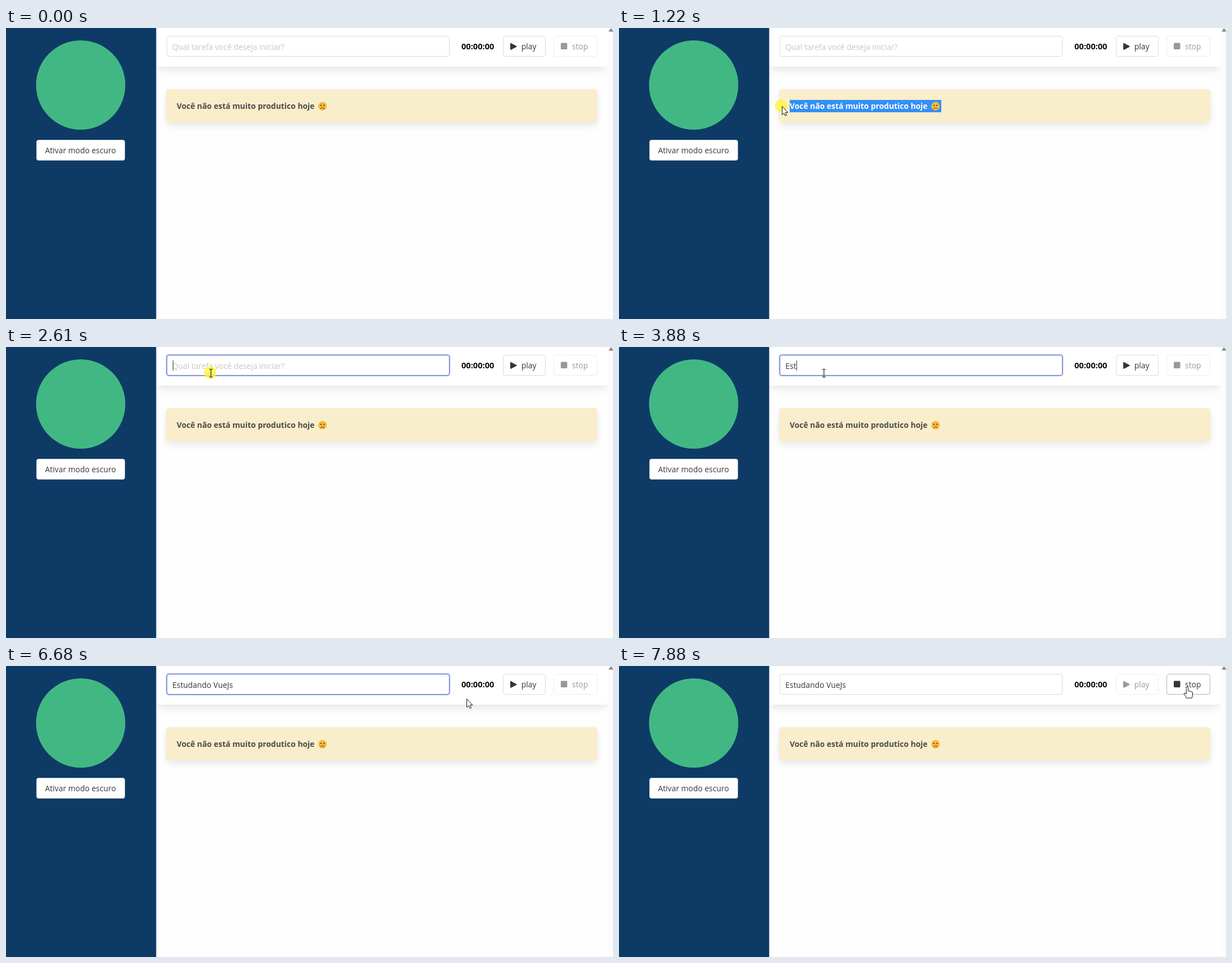
An HTML page that plays this animation: 1081 by 518 pixels, repeating every 8000 ms.

```html
<!DOCTYPE html>
<html lang="pt-BR">
<head>
<meta charset="utf-8">
<title>Tarefas</title>
<style>
html, body { margin: 0; width: 100%; height: 100%; overflow: hidden; background: #fefefe; }
div, svg { position: absolute; box-sizing: border-box; }
svg { left: 0; top: 0; }
text { font: 13.9px "Open Sans", "Noto Sans", sans-serif; fill: #363636; white-space: pre; }
.bold { font-weight: 700; }
.box { box-shadow: 0 7px 15px -2px rgba(10,10,10,.1), 0 0 0 1px rgba(10,10,10,.02); }
.control { background: #fff; border: 1px solid #dbdbdb; border-radius: 4px; top: 13.5px; height: 37px; }
.hover { border-color: #b5b5b5; }
.focus { border-color: #485fc7; box-shadow: 0 0 0 1.8px rgba(72,95,199,.25); }
#sidebar { left: 0; top: 0; width: 268px; height: 518px; background: linear-gradient(90deg, #0d3b66 267px, #fefefe 268px); }
#header { left: 267px; top: 0; width: 804px; height: 69px; background: #fff; border-radius: 0 0 5px 5px; }
#alert { left: 285px; top: 109px; width: 768px; height: 59px; background: #f9eecb; border-radius: 5px; }
#scrollbar { left: 1071px; top: 0; width: 10px; height: 518px; background: #fcfcfc; }
#mode { left: 54px; top: 199px; width: 158px; border-color: #ccd3da; }
#input { left: 286px; width: 504px; }
#play { left: 885px; width: 76px; }
#stop { left: 975px; width: 78px; }
</style>
</head>
<body>
<div id="header" class="box"></div>
<div id="sidebar"></div>
<div id="alert" class="box"></div>
<div id="scrollbar"></div>
<div id="mode" class="control"></div>
<div id="input" class="control"></div>
<div id="play" class="control"></div>
<div id="stop" class="control"></div>
<svg width="1081" height="518">
  <clipPath id="clip"><rect id="clipRect" y="128" width="270" height="22"/></clipPath>
  <circle cx="133" cy="101.5" r="79.5" fill="#41b883"/>
  <path d="M1073 6.5L1077.5 0L1082 6.5Z" fill="#8b8b8b"/>
  <text x="69.5" y="223.4">Ativar modo escuro</text>

  <text id="placeholder" x="296" y="38.5" style="fill:#c6c6c6">Qual tarefa você deseja iniciar?</text>
  <text id="typed" x="296.3" y="38.5"></text>
  <rect id="caret" y="24" width="1" height="18" fill="#363636"/>

  <text class="bold" x="811" y="38" style="font-size:14.6px;fill:#0a0a0a">00:00:00</text>
  <g id="playLabel">
    <path d="M899 27.8V37.8L908.5 32.8Z" fill="#363636" stroke="#363636" stroke-width="2" stroke-linejoin="round"/>
    <text x="917.8" y="38">play</text>
  </g>
  <g id="stopLabel">
    <rect x="988" y="26.5" width="11.5" height="11.5" rx="1.5" fill="#363636"/>
    <text x="1008" y="38">stop</text>
  </g>

  <text class="bold" x="304" y="144" style="fill:#4a4a4a">Você não está muito produtico hoje</text>
  <g id="selection" clip-path="url(#clip)">
    <rect x="304" y="128" width="270" height="22" fill="#3390f5"/>
    <text class="bold" x="304" y="144" style="fill:#fff">Você não está muito produtico hoje</text>
  </g>
  <g transform="translate(563.7 139.2)" fill="#5a4430">
    <circle r="7.6" fill="#fdb93a"/>
    <circle cx="-2.7" cy="-1.5" r="1.2"/>
    <circle cx="2.7" cy="-1.5" r="1.2"/>
    <path d="M-3 4.4Q0 1.2 3 4.4" fill="none" stroke="#5a4430" stroke-width="1.2" stroke-linecap="round"/>
  </g>

  <g id="pointer">
    <circle id="press" cx="-1.3" cy="-.5" r="11" fill="#fff636" opacity=".78"/>
    <path id="arrow" d="M.5 .5V15.6L3.9 12.4L6.2 17.3L8.6 16.2L6.3 11.4H10.8Z" fill="#fff" stroke="#111" stroke-linejoin="round"/>
    <path id="ibeam" d="M-3 -6.5H-1Q0 -6.5 0 -5.5Q0 -6.5 1 -6.5H3M0 -5.5V6.5M-3 7.5H-1Q0 7.5 0 6.5Q0 7.5 1 7.5H3" fill="none" stroke="#222" stroke-width="1.2"/>
    <path id="hand" d="M-1.7 1.6Q-1.7 0 0 0T1.7 1.6V7.5Q3 6.6 4.6 8Q6 7.4 7.2 8.8Q9.5 8.4 9.5 11V14Q9.5 17 8 20H-1.5Q-2.5 17.5 -5 14Q-6.5 11.8 -5.2 11Q-4 10.5 -1.7 13Z" fill="#fff" stroke="#111" stroke-linejoin="round"/>
  </g>
</svg>
<script>
const LOOP = 8000, BLINK = 530, PRESS = 200;
const ENTER = 140, DRAG = 820, RELEASE = 1480, DESELECT = 1680, FOCUS = 2610, START = 7280;

// sag bows the way downwards
const moves = [
  { from: ENTER, to: 670, x: 598, y: 142, sag: 0 },
  { from: DRAG, to: 1220, x: 290, y: 139, sag: -8 },
  { from: RELEASE, to: 1750, x: 383, y: 192, sag: 0 },
  { from: 1880, to: 2340, x: 365, y: 46, sag: 0 },
  { from: 6410, to: 6950, x: 970, y: 40, sag: 22 },
  { from: 6950, to: 7150, x: 925, y: 38, sag: 0 },
  { from: START + PRESS, to: 7880, x: 1012, y: 37, sag: 14 }
];
const bursts = [
  { at: 3410, pace: 235, text: "Est" },
  { at: 4020, pace: 120, text: "udando " },
  { at: 5080, pace: 140, text: "Vue" },
  { at: 5750, pace: 130, text: "Js" }
];
const keys = bursts.flatMap(({ at, pace, text }) =>
  [...text].map((letter, i) => ({ at: at + i * pace, letter })));

const $ = id => document.getElementById(id);
const within = (v, from, to) => v >= from && v < to;
const show = (id, visible) => $(id).style.display = visible ? "" : "none";
const fade = (id, disabled) => $(id).style.opacity = disabled ? .5 : 1;
const easeOut = k => 1 - (1 - k) ** 2;

function pointerAt(t) {
  let x = 682, y = 495;
  for (const move of moves.filter(m => m.from <= t)) {
    const k = easeOut(Math.min(1, (t - move.from) / (move.to - move.from)));
    x += (move.x - x) * k;
    y += (move.y - y) * k + move.sag * 4 * k * (1 - k);
  }
  return [x, y];
}

function zoneAt(x, y, running) {
  if (within(x, 304, 574) && within(y, 128, 150)) return "message";
  if (!within(y, 14, 51)) return "";
  if (within(x, 286, 790)) return "input";
  if (within(x, 885, 961) && !running) return "play";
  if (within(x, 975, 1053) && running) return "stop";
  return "";
}

function drawInput(t) {
  const typed = keys.filter(k => k.at <= t);
  const focused = within(t, FOCUS, START);
  const lastEvent = typed.at(-1)?.at ?? FOCUS;
  $("typed").textContent = typed.map(k => k.letter).join("");
  show("placeholder", !typed.length);
  show("caret", focused && Math.floor((t - lastEvent) / BLINK) % 2 === 0);
  $("caret").setAttribute("x", Math.round(296.5 + (typed.length && $("typed").getComputedTextLength())));
  $("input").classList.toggle("focus", focused);
}

function drawButtons(running) {
  for (const id of ["play", "playLabel"]) fade(id, running);
  for (const id of ["stop", "stopLabel"]) fade(id, !running);
}

function drawPointer(t, running) {
  const [x, y] = pointerAt(t);
  const zone = zoneAt(x, y, running);
  const shape = { message: "ibeam", input: "ibeam", play: "hand", stop: "hand" }[zone] ?? "arrow";
  show("pointer", t >= ENTER);
  for (const id of ["arrow", "ibeam", "hand"]) show(id, id === shape);
  for (const id of ["play", "stop"]) $(id).classList.toggle("hover", id === zone);
  $("input").classList.toggle("hover", zone === "input" && t < FOCUS);
  show("press", within(t, DRAG, RELEASE) || [FOCUS, START].some(at => within(t, at, at + PRESS)));
  $("pointer").setAttribute("transform", `translate(${Math.round(x)} ${Math.round(y)})`);

  show("selection", within(t, DRAG, DESELECT));
  $("clipRect").setAttribute("x", t < RELEASE ? Math.max(304, x) : 304);
}

const origin = performance.now();
function frame() {
  const t = (performance.now() - origin) % LOOP;
  const running = t >= START;
  drawInput(t);
  drawButtons(running);
  drawPointer(t, running);
  requestAnimationFrame(frame);
}
frame();
</script>
</body>
</html>
```
